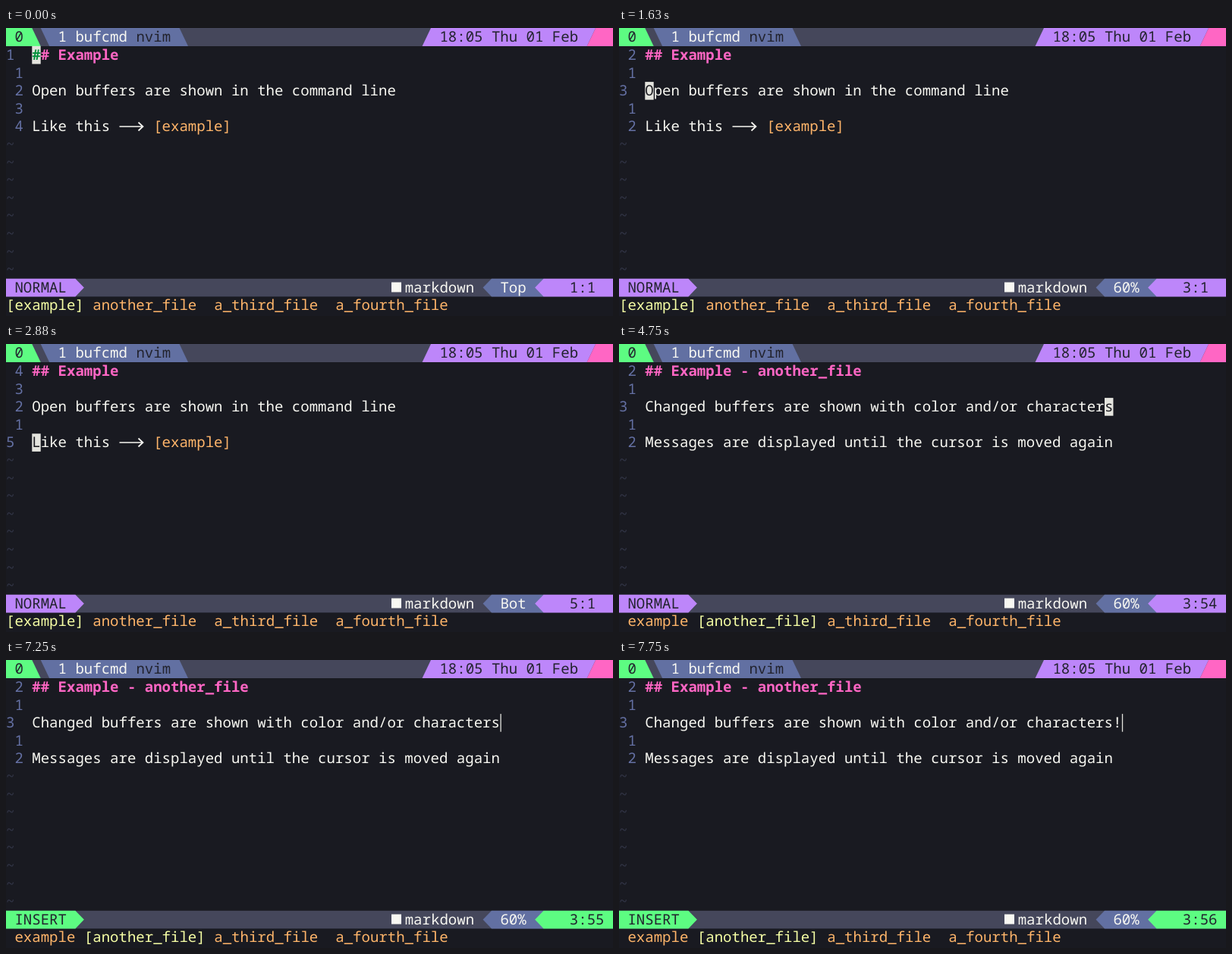
Write an HTML page that moves like this. It is 800x380 px and loops after 8000 ms.

```html
<!DOCTYPE html>
<html lang="en">
<head>
<meta charset="utf-8">
<title>Buffers in the command line</title>
<style>
  html, body { margin: 0; width: 100%; height: 100%; overflow: hidden; background: #191a21; }
  svg { display: block; width: 800px; height: 380px; }
  text {
    font: 19.05px "Noto Sans Mono", "DejaVu Sans Mono", monospace;
    white-space: pre;
    text-rendering: geometricPrecision;
  }
  .white { fill: #f8f8f2; }
  .dark { fill: #22232e; }
  .head { fill: #ff66c4; font-weight: 600; }
  .link { fill: #ffb56a; }
  .open { fill: #f6ffa5; }
  .num { fill: #6470a3; }
  .tilde { fill: #343749; }
  .gray { fill: #45475b; }
  .blue { fill: #6270a2; }
  .purple { fill: #bd86fa; }
  .green { fill: #5dfc82; }
  .pink { fill: #ff66c4; }
  .cursor { fill: #e4e4de; }
  .under { fill: #1b1b20; }
  .head.under { fill: #00913b; }
  .arrow { fill: none; stroke: #f8f8f2; stroke-width: 1.7; }
</style>
</head>
<body>
<svg id="stage" viewBox="0 0 800 380"></svg>
<script>
const CW = 800 / 70, RH = 23.6, LOOP = 8000;
const stage = document.getElementById('stage');

const text = (col, row, str, cls) =>
  `<text x="${col * CW}" y="${row * RH + 18.3}" class="${cls}">${str}</text>`;

const rect = (x, y, w, h, cls) =>
  `<rect x="${x}" y="${y}" width="${w}" height="${h}" class="${cls}"/>`;

// Points are [column, fraction of the row height].
const shape = (row, cls, ...pts) => {
  const list = pts.map(([c, f]) => `${c * CW},${(row + f) * RH + (row ? 0.4 : 0)}`);
  return `<polygon class="${cls}" points="${list.join(' ')}"/>`;
};

const FILES = {
  example: ['## Example', '', 'Open buffers are shown in the command line', '',
    'Like this     <tspan class="link">[example]</tspan>'],
  another_file: ['## Example - another_file', '',
    'Changed buffers are shown with color and/or characters', '',
    'Messages are displayed until the cursor is moved again']
};

// Start time, file, cursor line, cursor column, insert mode, typed suffix.
const STEPS = [
  [0, 'example', 1, 1],
  [500, 'example', 2, 1],
  [630, 'example', 4, 1],
  [750, 'example', 5, 1],
  [1630, 'example', 3, 1],
  [2630, 'example', 4, 1],
  [2880, 'example', 5, 1],
  [4750, 'another_file', 3, 54],
  [7250, 'another_file', 3, 55, true],
  [7630, 'another_file', 3, 56, true, '!']
];

function topBar() {
  return rect(0, 0, 800, 24, 'gray') +
    shape(0, 'green', [0, 0], [3, 0], [4, 1.02], [0, 1.02]) +
    shape(0, 'blue', [4, 0], [20, 0], [21, 1.02], [5, 1.02]) +
    shape(0, 'purple', [49, 0], [68, 0], [67, 1.02], [48, 1.02]) +
    shape(0, 'pink', [68, 0], [70, 0], [70, 1.02], [67, 1.02]) +
    text(1, 0, '0', 'dark') + text(6, 0, '1 bufcmd', 'white') +
    text(15, 0, 'nvim', 'dark') + text(50, 0, '18:05 Thu 01 Feb', 'dark');
}

function buffer(file, line, col, insert, typed = '') {
  const rows = FILES[file];
  let out = '';
  rows.forEach((str, i) => {
    const n = i + 1, here = n === line;
    out += text(here ? 0 : 1, n, here ? n : Math.abs(n - line), 'num') +
      text(3, n, here ? str + typed : str, n === 1 ? 'head' : 'white');
  });
  for (let r = 6; r < 14; r++) out += text(0, r, '~', 'tilde');
  if (file === 'example') out += '<path class="arrow" d="M149.5 130H180M174.5 124.5L180.5 130L174.5 135.5"/>';

  const x = (col + 2) * CW, y = line * RH + 0.3;
  if (insert) return out + rect(x, y, 1.3, RH, 'cursor');
  return out + rect(x, y, CW, RH, 'cursor') +
    text(col + 2, line, rows[line - 1][col - 1] || '', line === 1 ? 'head under' : 'under');
}

function statusBar(line, col, insert) {
  const mode = insert ? 'green' : 'purple';
  const place = line === 1 ? 'Top' : line === 5 ? 'Bot' : line * 20 + '%';
  return rect(0, 14 * RH + 0.4, 800, RH, 'gray') +
    shape(14, mode, [0, 0], [8, 0], [9, .5], [8, 1], [0, 1]) +
    shape(14, 'blue', [55, .5], [56, 0], [62, 0], [62, 1], [56, 1]) +
    shape(14, mode, [61, .5], [62, 0], [70, 0], [70, 1], [62, 1]) +
    rect(508, 335.5, 13, 13, 'white') +
    text(1, 14, insert ? 'INSERT' : 'NORMAL', 'dark') +
    text(46, 14, 'markdown', 'white') + text(57, 14, place, 'white') +
    text(65, 14, `${line}:${col}`, 'dark');
}

function bufferList(file) {
  let col = 0;
  return ['example', 'another_file', 'a_third_file', 'a_fourth_file'].map(name => {
    const on = name === file;
    const item = text(col, 15, on ? `[${name}]` : ` ${name} `, on ? 'open' : 'link');
    col += name.length + 2;
    return item;
  }).join('');
}

let shown;
function frame(now) {
  const t = now % LOOP;
  const step = STEPS.findLast(s => s[0] <= t);
  if (step !== shown) {
    shown = step;
    const [, file, line, col, insert, typed] = step;
    stage.innerHTML = topBar() + buffer(file, line, col, insert, typed) +
      statusBar(line, col, insert) + bufferList(file);
  }
  requestAnimationFrame(frame);
}
frame(0);
</script>
</body>
</html>
```
